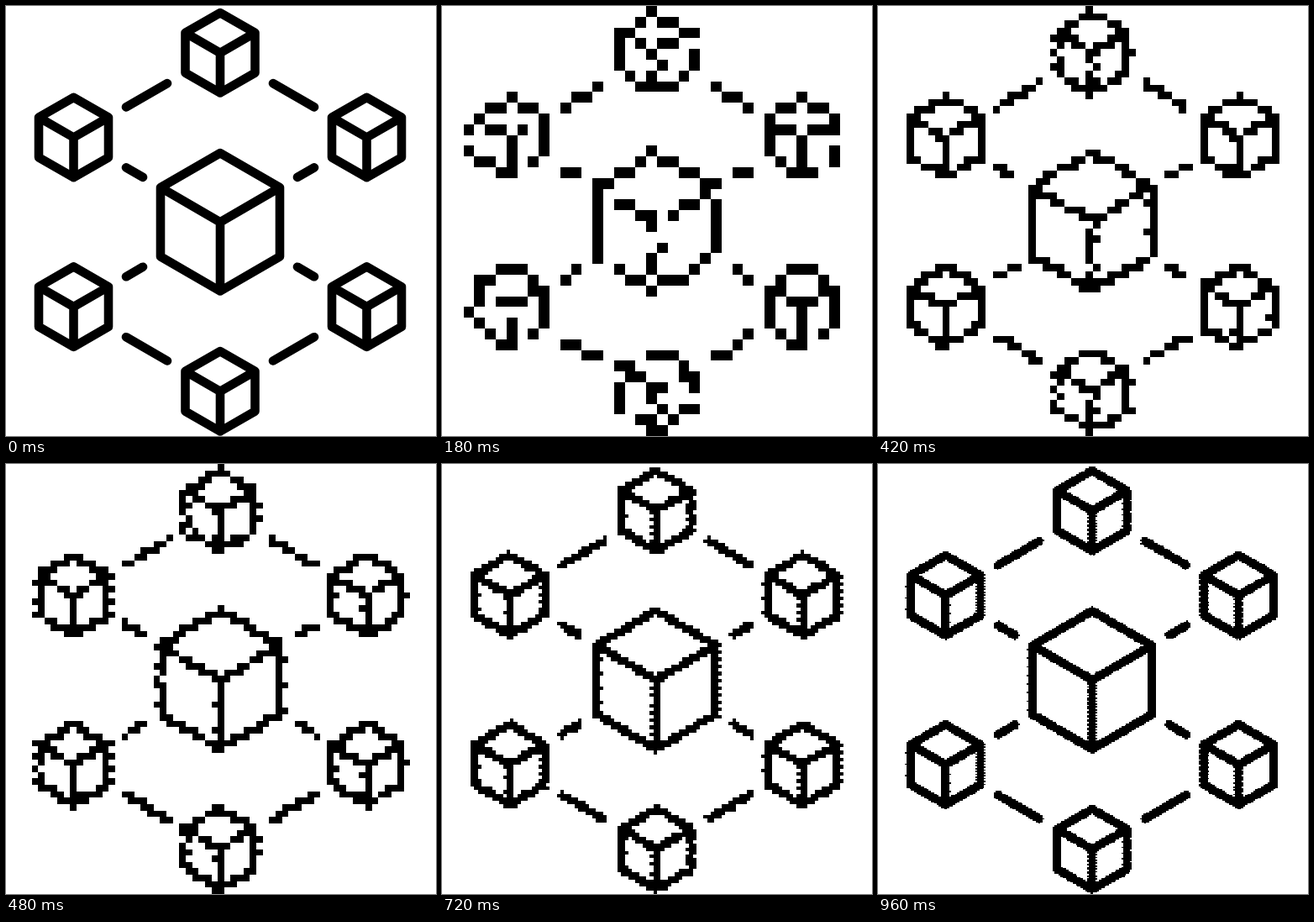
These frames come from a looping animation (512 px wide and 512 px high, 1020 ms). An HTML page with a canvas:

```html
<!DOCTYPE html>
<html lang="en">
<head>
<meta charset="utf-8">
<title>Block network resolving from pixels</title>
<style>
  html, body { margin: 0; width: 100%; height: 100%; overflow: hidden; background: #fff; }
  canvas { display: block; width: 100vw; height: 100vh; image-rendering: pixelated; }
</style>
</head>
<body>
<canvas id="stage" width="512" height="512"></canvas>
<script>
const SIZE = 512, STEP = 60, OVER = 4, GAMMA = 1.2;
const CX = 255, CY = 257.3;

// Mosaic columns for each step; 0 is the sharp picture.
const COLUMNS = [0, 33, 36, 40, 45, 50, 55, 60, 67, 75, 86, 100, 120, 150, 200, 240, 300];

function makeCanvas(size) {
  const c = document.createElement('canvas');
  c.width = c.height = size;
  return c;
}

function addCube(p, x, y, w, h) {
  const d = h / 2;
  p.moveTo(x, y - h);
  p.lineTo(x + w, y - d);
  p.lineTo(x + w, y + d);
  p.lineTo(x, y + h);
  p.lineTo(x - w, y + d);
  p.lineTo(x - w, y - d);
  p.closePath();
  p.moveTo(x - w, y - d);
  p.lineTo(x, y);
  p.lineTo(x + w, y - d);
  p.moveTo(x, y);
  p.lineTo(x, y + h);
}

function buildPath() {
  const p = new Path2D();
  addCube(p, CX, CY, 71, 82.2);
  for (const sy of [-1, 1]) {
    addCube(p, CX, CY + sy * 201.5, 41.5, 47.7);
    for (const sx of [-1, 1]) {
      const line = (x1, y1, x2, y2) => {
        p.moveTo(CX + sx * x1, CY + sy * y1);
        p.lineTo(CX + sx * x2, CY + sy * y2);
      };
      addCube(p, CX + sx * 174.5, CY + sy * 100.8, 41.5, 47.7);
      line(112, 136.9, 63, 165.2);
      line(112, 65, 92, 53.4);
    }
  }
  return p;
}

const path = buildPath();

function drawNetwork(size) {
  const c = makeCanvas(size);
  const g = c.getContext('2d', { willReadFrequently: true });
  g.fillStyle = '#fff';
  g.fillRect(0, 0, size, size);
  g.scale(size / SIZE, size / SIZE);
  g.lineWidth = 10.6;
  g.lineCap = g.lineJoin = 'round';
  g.strokeStyle = '#000';
  g.stroke(path);
  return c;
}

// Average brightness of each mosaic cell, 0 (black) to 1 (white).
function cellTones(n) {
  const w = n * OVER;
  const px = drawNetwork(w).getContext('2d').getImageData(0, 0, w, w).data;
  const tones = new Float32Array(n * n);
  for (let y = 0; y < w; y++) {
    const row = Math.floor(y / OVER) * n;
    for (let x = 0; x < w; x++) {
      tones[row + Math.floor(x / OVER)] += px[(y * w + x) * 4];
    }
  }
  return tones.map(v => Math.pow(v / (255 * OVER * OVER), 1 / GAMMA));
}

// Two-tone error diffusion, rows scanned in alternating directions.
function mosaic(n) {
  const tones = cellTones(n);
  const c = makeCanvas(n), g = c.getContext('2d');
  const img = g.createImageData(n, n);
  const spread = (x, y, e) => {
    if (x >= 0 && x < n && y < n) tones[y * n + x] += e;
  };
  for (let y = 0; y < n; y++) {
    const dir = y % 2 ? 1 : -1;
    for (let i = 0; i < n; i++) {
      const x = dir > 0 ? i : n - 1 - i;
      const k = y * n + x;
      const v = Math.min(1, Math.max(0, tones[k]));
      const out = v > 0.5 ? 1 : 0;
      const e = (v - out) / 16;
      spread(x + dir, y, e * 7);
      spread(x - dir, y + 1, e * 3);
      spread(x, y + 1, e * 5);
      spread(x + dir, y + 1, e);
      img.data.fill(out * 255, k * 4, k * 4 + 3);
      img.data[k * 4 + 3] = 255;
    }
  }
  g.putImageData(img, 0, 0);
  return c;
}

const pictures = COLUMNS.map(n => n ? mosaic(n) : drawNetwork(SIZE));
const ctx = document.getElementById('stage').getContext('2d');
ctx.imageSmoothingEnabled = false;

const start = performance.now();
let shown = -1;

function show(i) {
  if (i === shown) return;
  shown = i;
  ctx.drawImage(pictures[i], 0, 0, SIZE, SIZE);
}

function tick(now) {
  show(Math.floor(Math.max(0, now - start) / STEP) % pictures.length);
  requestAnimationFrame(tick);
}

show(0);
requestAnimationFrame(tick);
</script>
</body>
</html>
```
